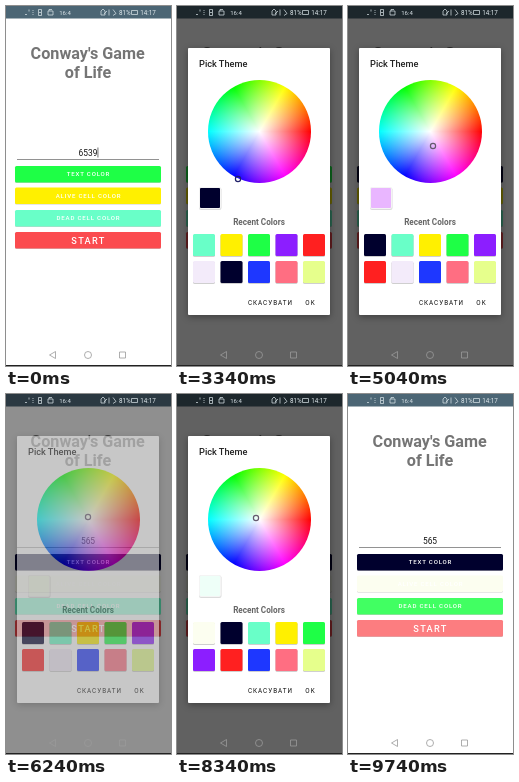
An HTML page that plays this animation: 165 by 360 pixels, repeating every 9840 ms.

```html
<!DOCTYPE html>
<html lang="en">
<head>
<meta charset="utf-8">
<title>Game of Life settings</title>
<style>
html, body { margin: 0; width: 100%; height: 100%; overflow: hidden; background: #fff; }
#stage { position: relative; width: 165px; height: 360px; overflow: hidden; background: #fff; }
svg, #dim, #dialog { position: absolute; left: 0; top: 0; width: 165px; height: 360px; }
svg { display: block; overflow: hidden; }
text { font-family: Roboto, sans-serif; }
#dim { background: #000; }
#sheet { position: absolute; left: 11px; top: 42px; width: 142px; height: 267px; background: #fff; border-radius: 1px; box-shadow: 0 2px 7px rgba(0,0,0,.35); }
#wheel { position: absolute; left: 30.5px; top: 74px; width: 103px; height: 103px; border-radius: 50%;
  background: radial-gradient(closest-side, #fff, rgba(255,255,255,0)), conic-gradient(from 90deg, #f00, #f0f, #00f, #0ff, #0f0, #ff0, #f00); }
</style>
</head>
<body>
<div id="stage">
  <svg id="screen" viewBox="0 0 165 360"></svg>
  <div id="dim"></div>
  <div id="dialog">
    <div id="sheet"></div>
    <div id="wheel"></div>
    <svg id="picker" viewBox="0 0 165 360"></svg>
  </div>
  <svg id="system" viewBox="0 0 165 360"></svg>
</div>
<script>
const LOOP = 9840;
const C = {
  mint: '#69ffc8', yellow: '#fff000', green: '#1eff46', purple: '#8c1eff', red: '#ff2020',
  lavender: '#f3ebfa', navy: '#00002d', blue: '#1e37ff', salmon: '#ff6e82', lime: '#e6ff8c',
  ivory: '#fcfef0', leaf: '#41ff62'
};
const $ = id => document.getElementById(id);

function add(parent, tag, attrs, label) {
  const el = document.createElementNS('http://www.w3.org/2000/svg', tag);
  for (const key in attrs) el.setAttribute(key, attrs[key]);
  if (label !== undefined) el.textContent = label;
  parent.append(el);
  return el;
}
const rect = (p, x, y, width, height, fill, rx = 0) => add(p, 'rect', { x, y, width, height, fill, rx });
const label = (p, x, y, size, fill, str, more) =>
  add(p, 'text', { x, y, 'font-size': size, fill, 'text-anchor': 'middle', ...more }, str);
const line = (p, d, stroke, width = 0.8) => add(p, 'path', { d, stroke, 'stroke-width': width, fill: 'none' });

// Main screen
const screen = $('screen');
const bold = { 'font-weight': 700 };
label(screen, 81.7, 53, 16.2, '#757575', "Conway's Game", bold);
label(screen, 82, 72, 16.2, '#757575', 'of Life', bold);
const field = label(screen, 82, 150, 8.4, '#111', '');
const cursor = rect(screen, 91.3, 141.5, 0.7, 10, '#333');
rect(screen, 11, 153, 142, 0.8, '#777');

const buttons = [
  ['TEXT COLOR', 160, 6.1], ['ALIVE CELL COLOR', 181.5, 6.1],
  ['DEAD CELL COLOR', 204, 6.1], ['START', 226, 9.2]
].map(([name, y, size]) => {
  rect(screen, 9, y + 1, 146, 16, 'rgba(0,0,0,.2)', 1.5);
  const face = rect(screen, 9, y, 146, 16.5, '#fb4b4f', 1.5);
  label(screen, 82.5, y + 8.3 + size * 0.36, size, '#fff', name,
    { 'font-weight': 500, 'letter-spacing': size > 8 ? 1.3 : 0.8 });
  const glow = rect(screen, 9, y, 146, 16.5, '#fff', 1.5);
  return { face, glow };
});

// Keyboard
const keyboard = add(screen, 'g', {});
rect(keyboard, 0, 236, 165, 124, '#fdfdfd');
const keyX = [16, 48, 80, 109, 131, 153];
const keyGlow = rect(keyboard, 0, 0, 28, 23, '#d9dcdf', 2);
['123(),', '456+-.', '789/N', '*0#.'].forEach((row, r) =>
  [...row].forEach((ch, c) => label(keyboard, keyX[c], 251.5 + r * 25, c < 3 ? 10 : 9, '#222', ch)));
line(keyboard, 'M146 298l4-4h8v8h-8zM151.5 296l4 4m0-4l-4 4', '#8296ea');
line(keyboard, 'M158 319v5h-10m3-3l-3 3l3 3', '#8296ea');

rect(screen, 0, 0, 165, 12.5, '#4c6675');

// Colour picker
const picker = $('picker');
label(picker, 22, 61, 9.2, '#222', 'Pick Theme', { 'text-anchor': 'start', 'font-weight': 500 });
rect(picker, 22, 181.5, 22.5, 22.5, 'rgba(0,0,0,.14)', 2);
rect(picker, 22, 181, 22, 22, '#f4f4f4', 2);
const swatch = rect(picker, 23, 182, 20, 20, '#fff', 1);
label(picker, 82, 219, 8.2, '#666', 'Recent Colors', bold);
const chips = Array.from({ length: 10 }, (_, i) => {
  const x = 16 + (i % 5) * 27.5, y = i < 5 ? 228 : 255;
  rect(picker, x, y + 0.7, 22, 22, 'rgba(0,0,0,.25)', 1.5);
  return rect(picker, x, y, 22, 22, '#fff', 1.5);
});
const okGlow = rect(picker, 119, 289, 28, 15, '#000', 2);
const action = { 'font-weight': 400, 'letter-spacing': 1 };
label(picker, 93.5, 299, 6.3, '#111', 'СКАСУВАТИ', action);
label(picker, 133.5, 299, 6.3, '#111', 'OK', action);
const marker = add(picker, 'circle', { r: 2.6, 'stroke-width': 1.2, fill: 'none' });

// Status and navigation icons stay bright above the dialog
const system = $('system');
const pale = '#dfe8ec', grey = '#9a9a9a';
line(system, 'M19 8.5h2m2-5v2M27 4v1m0 1v1m0 1v1M32.5 3.5h3v6h-3zM33 6.5h2M42 5h5v4h-5zM43 5v-1.5h3', pale, 0.7);
label(system, 59, 9, 6, pale, '16:4');
line(system, 'M95 9v-4l2-2l2 2v4zM98 8l3-3M103 3.5v6M107 3.5l3 4l-3 2M125.5 4.5h6v4h-6z', pale, 0.7);
label(system, 118.8, 9, 6.3, pale, '81%');
label(system, 142, 9, 6.3, pale, '14:17');
const back = line(system, 'M43.5 349l6-3.5v7z', grey);
add(system, 'circle', { cx: 82, cy: 349, r: 3.5, fill: 'none', stroke: grey, 'stroke-width': 0.8 });
line(system, 'M113.5 346h6v6h-6z', grey);
rect(system, 0, 359, 165, 1, '#222');

// Timeline
const numbers = [[0, '6539'], [740, '653'], [840, '65'], [940, '6'], [1040, ''], [1240, '5'], [1440, '56'], [1740, '565']];
const keyTaps = [[740, 5, 2], [840, 5, 2], [940, 5, 2], [1040, 5, 2], [1240, 1, 1], [1440, 2, 1], [1740, 1, 1]];
const keyboardY = [[40, 124], [140, 95], [240, 45], [340, 14], [440, 0], [1940, 0], [2040, 25], [2140, 75], [2240, 124]];
const taps = [2340, 4240, 6540, 9540];
const sessions = [
  { open: 2540, ok: 3440, close: 3940, path: [[3040, 53, 91], [3140, 61, 173]],
    recent: 'mint yellow green purple red lavender navy blue salmon lime' },
  { open: 4440, ok: 5940, close: 6240, path: [[4840, 110, 83], [4940, 94, 130], [5040, 85, 140], [5240, 72, 137], [5440, 70, 122], [5740, 82, 123]],
    recent: 'navy mint yellow green purple red lavender blue salmon lime' },
  { open: 6740, ok: 9040, close: 9240, path: [[7240, 54, 114], [7440, 62, 134], [7640, 78, 141], [7840, 88, 130], [8040, 79, 124], [8340, 79, 124], [8640, 67, 112], [8940, 57, 96]],
    recent: 'ivory navy mint yellow green purple red blue salmon lime' }
];
const colours = [[C.green, C.navy], [C.yellow, C.ivory], [C.mint, C.leaf]];

function at(path, t, i) {
  const n = path.findIndex(p => p[0] > t);
  if (n === 0) return path[0][i];
  if (n < 0) return path[path.length - 1][i];
  const a = path[n - 1], b = path[n];
  return a[i] + (b[i] - a[i]) * (t - a[0]) / (b[0] - a[0]);
}

function wheelColour(x, y) {
  const dx = x - 82, dy = 125.5 - y;
  const hue = (Math.atan2(dy, dx) * 180 / Math.PI + 360) % 360;
  const sat = Math.min(1, Math.hypot(dx, dy) / 51.5);
  const channel = n => {
    const k = (n + hue / 60) % 6;
    return Math.round(255 * (1 - sat * Math.max(0, Math.min(k, 4 - k, 1))));
  };
  return `rgb(${channel(5)},${channel(3)},${channel(1)})`;
}

const set = (el, key, value) => el.setAttribute(key, value);
const pulse = (t, start) => t < start || t > start + 200 ? 0 : t - start < 100 ? 0.14 : 0.28;

function drawPicker(t) {
  const s = sessions.find(d => t >= d.open && t < d.close + 100);
  const closing = s && t >= s.close;
  const shown = !s ? 0 : closing ? 0.5 : Math.min(1, (t - s.open + 100) / 300);
  $('dialog').style.opacity = shown;
  $('dim').style.opacity = closing ? 0.44 : shown * 0.62;
  if (!s) return;
  s.recent.split(' ').forEach((name, i) => set(chips[i], 'fill', C[name]));
  const x = at(s.path, t, 1), y = at(s.path, t, 2);
  const fill = s === sessions[0] && t >= 3140 ? C.navy : wheelColour(x, y);
  set(marker, 'cx', x);
  set(marker, 'cy', y);
  set(marker, 'stroke', fill === C.navy ? '#20206a' : '#665a70');
  set(swatch, 'fill', fill);
  set(okGlow, 'opacity', pulse(t, s.ok) * 0.4);
}

function draw(t) {
  const value = numbers.filter(n => n[0] <= t).pop()[1];
  field.textContent = value;
  set(cursor, 'x', 82.2 + value.length * 2.35);
  set(cursor, 'opacity', t < 2000 && Math.floor(t / 500) % 2 === 0 ? 1 : 0);

  const drop = at(keyboardY, t, 1);
  set(keyboard, 'transform', `translate(0 ${drop})`);
  const key = keyTaps.find(k => t >= k[0] && t < k[0] + 100);
  set(keyGlow, 'opacity', key ? 1 : 0);
  if (key) {
    set(keyGlow, 'x', keyX[key[1]] - 14);
    set(keyGlow, 'y', 236.5 + key[2] * 25);
  }
  set(back, 'transform', drop < 60 ? 'rotate(-90 46.5 349)' : '');

  buttons.forEach(({ face, glow }, i) => {
    if (i < 3) set(face, 'fill', colours[i][t >= sessions[i].close ? 1 : 0]);
    set(glow, 'opacity', pulse(t, taps[i]));
  });
  drawPicker(t);
}

// Each pose holds for 100 ms after a 40 ms opening.
function tick() {
  const t = performance.now() % LOOP;
  draw(t < 40 ? 0 : 40 + Math.floor((t - 40) / 100) * 100);
  requestAnimationFrame(tick);
}
tick();
</script>
</body>
</html>
```
